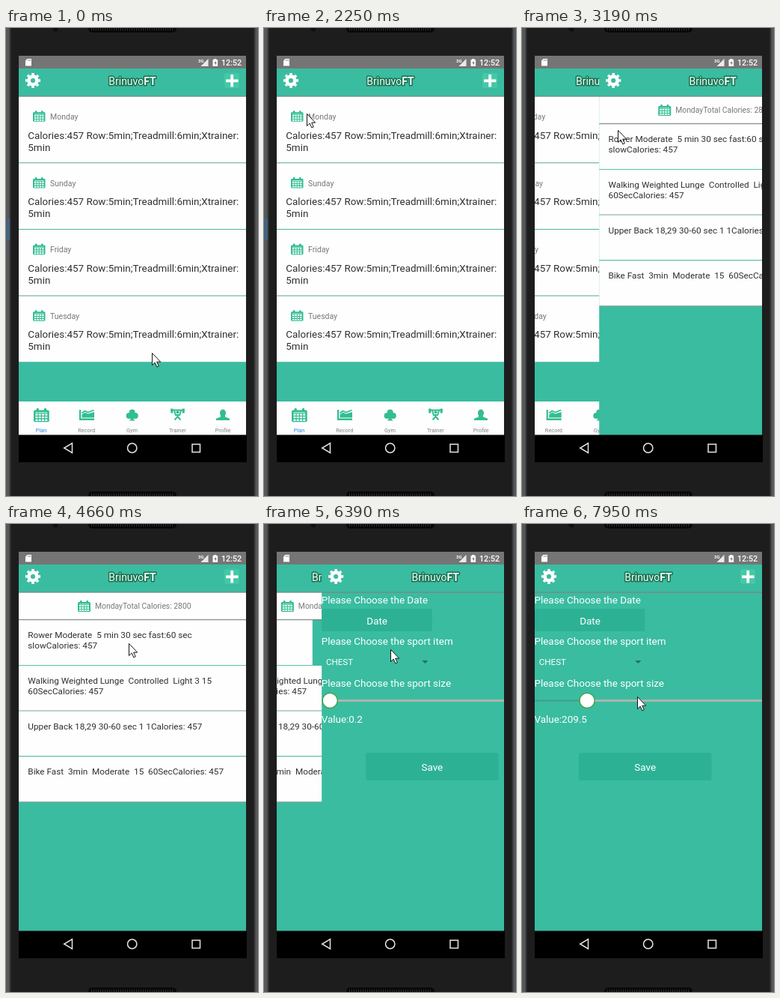
An HTML page for the animation above (8000 ms loop, 337 by 624 pixels).

```html
<!DOCTYPE html>
<html lang="en">
<head>
<meta charset="utf-8">
<style>
  html, body { margin: 0; height: 100%; overflow: hidden; background: #1d1d1d; }
  svg { display: block; }
  text { font-family: Roboto, sans-serif; white-space: pre; }
</style>
</head>
<body>
<svg id="stage" width="337" height="624" viewBox="0 0 337 624"></svg>
<script>
const GREEN = '#3abca0', ICON = '#32bd92', LEFT = 17, WIDTH = 304, TOP = 54;
const stage = document.getElementById('stage');
const $ = id => document.getElementById(id);

const rect = (x, y, w, h, fill, more = '') =>
  `<rect x="${x}" y="${y}" width="${w}" height="${h}" fill="${fill}" ${more}/>`;
const text = (s, x, y, size, fill, more = '') =>
  `<text x="${x}" y="${y}" font-size="${size}" fill="${fill}" ${more}>${s}</text>`;
const path = (d, more = '') => `<path d="${d}" ${more}/>`;
const group = (s, more = '') => `<g ${more}>${s}</g>`;
const MIDDLE = 'text-anchor="middle"';

const calendar = (x, y, k = 1) => group(
  rect(0, 2, 17, 13, ICON, 'rx="1.5"') +
  rect(3, 0, 2.6, 4, ICON, 'rx="1"') + rect(11.4, 0, 2.6, 4, ICON, 'rx="1"') +
  path('M2 4.8h13', 'stroke="#fff" stroke-width=".7"') +
  path('M2 7h13M2 10h13M2 13h13', 'stroke="#fff" stroke-width="1.9" stroke-dasharray="2.5 1"'),
  `transform="translate(${x} ${y}) scale(${k})"`);

const header = () =>
  rect(LEFT, TOP, WIDTH, 489, GREEN) +
  rect(LEFT, 90.4, WIDTH, 1.4, '#7d8783') +
  `<g fill="none" stroke="#fff" transform="translate(36 70)">
     <circle r="5.4" stroke-width="4.6"/>
     <circle r="8.4" stroke-width="3.4" pathLength="16" stroke-dasharray="1" transform="rotate(-11)"/>
   </g>` +
  rect(292, 60, 20, 20, '#45c8a6', 'rx="3"') +
  path('M294 70.3h16.5M302.2 62v16.5', 'stroke="#fff" stroke-width="3.8"') +
  text('Brinuvo<tspan font-weight="700">FT</tspan>', 169, 75.5, 14, '#f4fff8',
    MIDDLE + ' stroke="#17704f" stroke-width="3" stroke-linejoin="round" paint-order="stroke"');

function planScene() {
  const rows = ['Monday', 'Sunday', 'Friday', 'Tuesday'].map((day, i) => {
    const y = 91.7 + i * 88.65;
    return rect(LEFT, y, WIDTH, 87.6, '#fefefe', i ? '' : 'id="firstRow"') +
      rect(LEFT, y + 87.6, WIDTH, 1.1, i % 2 ? '#52bba6' : '#a0b3ad') +
      calendar(36, y + 18.6, 0.97) +
      text(day, 59, y + 30.3, 10.5, '#777') +
      text('Calories:457 Row:5min;Treadmill:6min;Xtrainer:', 29.3, y + 55.8, 13.45, '#303030') +
      text('5min', 29.3, y + 71.8, 13.45, '#303030');
  }).join('');
  const icons =
    calendar(37, 507, 1.22) +
    group(
      path('M98 509h2.2v11.6H118v2.4H98z') +
      path('M101.5 519.5v-4l4-3 4 2 8.5-2.5v7.5z') +
      path('M101.5 513.5l4-3 4 2 8-3', 'fill="none" stroke="' + ICON + '" stroke-width="1.8"') +
      '<circle cx="168.7" cy="512.4" r="4"/><circle cx="164.6" cy="517" r="4"/><circle cx="172.8" cy="517" r="4"/>' +
      path('M167.4 515h2.6l.7 6.5 2 2h-8l2-2z') +
      '<circle cx="229.5" cy="512.3" r="2"/>' +
      path('M220 509.5h19M225 510l1.8 6h5.4l1.8-6M229.5 515v4M229.5 518l-4 4.5M229.5 518l4 4.5',
        'fill="none" stroke="' + ICON + '" stroke-width="1.9"') +
      path('M220.3 507.5h3v6h-3zM235.7 507.5h3v6h-3z') +
      '<ellipse cx="290" cy="513.4" rx="4" ry="4.8"/>' +
      path('M281 523v-2.2l6-2.3v-2h6v2l6 2.3v2.2z'), `fill="${ICON}"`);
  const labels = ['Plan', 'Record', 'Gym', 'Trainer', 'Profile'].map((s, i) =>
    text(s, 47 + i * 60.8, 539, 7.4, i ? '#808080' : '#2f83e4', MIDDLE)).join('');
  return header() + rows + rect(LEFT, 498, WIDTH, 45, '#fefefe') + icons + labels;
}

function detailScene() {
  const items = [
    ['Rower Moderate  5 min 30 sec fast:60 sec', 'slowCalories: 457'],
    ['Walking Weighted Lunge  Controlled  Light 3 15', '60SecCalories: 457'],
    ['Upper Back 18,29 30-60 sec 1 1Calories: 457'],
    ['Bike Fast  3min  Moderate  15  60SecCalories: 457']];
  const rows = items.map((lines, i) => {
    const y = 128.2 + i * 60.7;
    const row = rect(LEFT, y, WIDTH, 59.8, '#fefefe') + lines.map((s, j) =>
      text(s, 29.3, y + 23.9 + j * 14, 11.78, '#303030')).join('');
    return group(row, i ? '' : 'id="row"') +
      rect(LEFT, y + 59.8, WIDTH, 1.2, i % 2 ? '#98aaa4' : '#4cbba4');
  }).join('');
  const buttons = [['Edit', GREEN], ['Submit', '#fd9427'], ['Delete', '#fd3d39']].map(([s, color]) =>
    `<svg class="button" y="128.2" height="60.4">${rect(0, 0, '100%', '100%', color)}` +
    text(s, '50%', 34.8, 10.55, '#fff', MIDDLE) + '</svg>').join('');
  return header() + rect(LEFT, 91.7, WIDTH, 36, '#fefefe') +
    rect(LEFT, 127.2, WIDTH, 1.4, '#777') + calendar(96, 102) +
    text('MondayTotal Calories: 2800', 119, 113.3, 10.35, '#777') + rows + buttons;
}

function formScene() {
  const label = (s, y, more) => text(s, 16.5, y, 13.45, '#fff', more);
  return header() +
    label('Please Choose the Date', 106) +
    rect(17, 113, 147.5, 30, '#2db195', 'rx="2"') + text('Date', 91, 133.5, 13.45, '#fff', MIDDLE) +
    label('Please Choose the sport item', 161.3) +
    text('CHEST', 22.8, 188.3, 11.6, '#fff') +
    path('M151.3 182h8l-4 4z', 'fill="#21705f"') +
    label('Please Choose the sport size', 216.7) +
    rect(LEFT, 234.6, WIDTH, 1.7, '#4a9584') +
    rect(28, 234, 293, 3, '#b0b3ae', 'id="track"') +
    '<circle id="thumb" cy="235.4" r="10" fill="#fff" stroke="#3fa548" stroke-width="1.3"/>' +
    label('', 264.5, 'id="value"') +
    rect(76, 305, 177.5, 37, '#2db195', 'rx="3"') + text('Save', 164.7, 328.8, 13.45, '#fff', MIDDLE);
}

const grille = y => rect(110, y, 118, 12, '#080808', 'rx="5"') +
  path(`M114 ${y + 6}h110`, 'stroke="#2d2d2d" stroke-width="7" stroke-dasharray="1 2"');

stage.innerHTML =
  rect(0, 0, 337, 624, '#56585a') +
  rect(4.5, -20, 329, 664, '#363738') + rect(6.5, -20, 325, 664, '#1d1d1d') +
  rect(0, 254, 5, 29, '#45617c', 'id="glow"') +
  grille(-6) + grille(618) + '<circle cx="66" cy="1" r="3.5" fill="#0c0e14"/>' +
  rect(LEFT, 37, WIDTH, 17, '#757575') +
  path('M28.5 41H34v9.5h-8v-7z', 'fill="#fff"') +
  path('M29.3 42v2M31 42v2M32.6 42v2', 'stroke="#757575" stroke-width=".7"') +
  text('3G', 257, 45.5, 6, '#fff', 'font-weight="700"') +
  path('M270.5 41v10h-10z', 'fill="#fff" opacity=".85"') +
  path('M276.5 42.3h1.8V41h3v1.3h1.8V51h-6.6z', 'fill="#fff"') +
  path('M280.6 43.5l-2.4 3.6h1.6v2.6l2-3.7h-1.5z', 'fill="#757575"') +
  text('12:52', 288, 50, 10.7, '#fff', 'font-weight="500"') +
  `<clipPath id="screen">${rect(LEFT, TOP, WIDTH, 489, '#000')}</clipPath>` +
  group(group(planScene(), 'id="plan"') + group(detailScene(), 'id="detail"') +
    group(formScene(), 'id="form"'), 'clip-path="url(#screen)"') +
  rect(LEFT, 542.5, 305, 36.5, '#000') +
  group(path('M88.5 553.5v13l-10.8-6.5z') + '<circle cx="168.7" cy="560" r="6.2"/>' +
    path('M249 555h10.5v10.5H249z'), 'fill="none" stroke="#e4e4e4" stroke-width="1.5"') +
  path('M.5.5V16.6l3.7-3.5 2.6 5.8 2.5-1.1-2.6-5.6h5z',
    'id="cursor" fill="#fff" stroke="#151515" stroke-linejoin="round"');

// The picture updates in 120 ms beats, restarted at each of these moments.
const beats = [0, 270, 1530, 2640, 3070, 4660, 4810, 5780, 6240, 6390, 7590];
function snap(t) {
  const start = beats.filter(b => b <= t).pop();
  return start + Math.floor((t - start) / 120) * 120;
}

// Keys are [time, ...values], joined by straight lines.
function at(keys, t) {
  const i = keys.findIndex(k => k[0] > t);
  if (i < 0) return keys[keys.length - 1].slice(1);
  if (i === 0) return keys[0].slice(1);
  const a = keys[i - 1], b = keys[i], u = (t - a[0]) / (b[0] - a[0]);
  return a.slice(1).map((v, j) => v + (b[j + 1] - v) * u);
}

const cursorKeys = [
  [240, 195, 433], [600, 172, 288], [870, 106, 400], [1230, 117, 518], [1480, 117, 518],
  [1770, 92, 330], [2130, 50, 96], [2250, 57, 114], [3000, 57, 114], [3070, 98, 126],
  [3190, 128, 136], [3790, 164, 159], [4660, 164, 159], [4930, 240, 157], [5290, 95, 160],
  [5410, 95, 161], [5650, 149, 163], [5770, 149, 163], [5780, 169, 167], [6630, 169, 167],
  [7110, 35, 230], [7230, 35, 230], [7350, 32, 230], [7470, 32, 230],
  [7590, 40, 230], [7710, 62, 230], [7830, 91, 230], [7950, 154, 230]];
const swipeKeys = [[4930, 0], [5290, 145], [5530, 183]];
const valueKeys = [[7590, 0.2], [7710, 30], [7830, 105], [7950, 209.5]];

function slide(t, start, lead) {
  if (t < start) return 0;
  return t >= start + 800 ? 1 : 1 - Math.exp(-0.006 * (t - start + lead));
}
const move = (id, x, y = 0) => $(id).setAttribute('transform', `translate(${x} ${y})`);

function draw(now) {
  const t = snap(now % 8000);
  const first = slide(t, 3070, 90), second = slide(t, 6240, 120);
  move('plan', -0.3 * WIDTH * first);
  move('detail', WIDTH * (1 - first) - 0.3 * WIDTH * second);
  move('form', WIDTH * (1 - second));
  move('cursor', ...at(cursorKeys, t));

  const pressed = t >= 2640 && t < 2760;
  $('firstRow').setAttribute('fill', pressed ? '#dedede' : '#fefefe');
  $('glow').setAttribute('visibility', t < 2640 ? 'visible' : 'hidden');

  const [open] = at(swipeKeys, t);
  move('row', -open);
  document.querySelectorAll('.button').forEach((b, i) => {
    b.setAttribute('x', LEFT + WIDTH - open + i * open / 3);
    b.setAttribute('width', open / 3);
  });

  const [value] = at(valueKeys, t), x = 28 + 0.282 * value;
  $('thumb').setAttribute('cx', x);
  $('track').setAttribute('x', x);
  $('track').setAttribute('width', LEFT + WIDTH - x);
  $('value').textContent = 'Value:' + value.toFixed(1);
  requestAnimationFrame(draw);
}
draw(performance.now());
</script>
</body>
</html>
```
